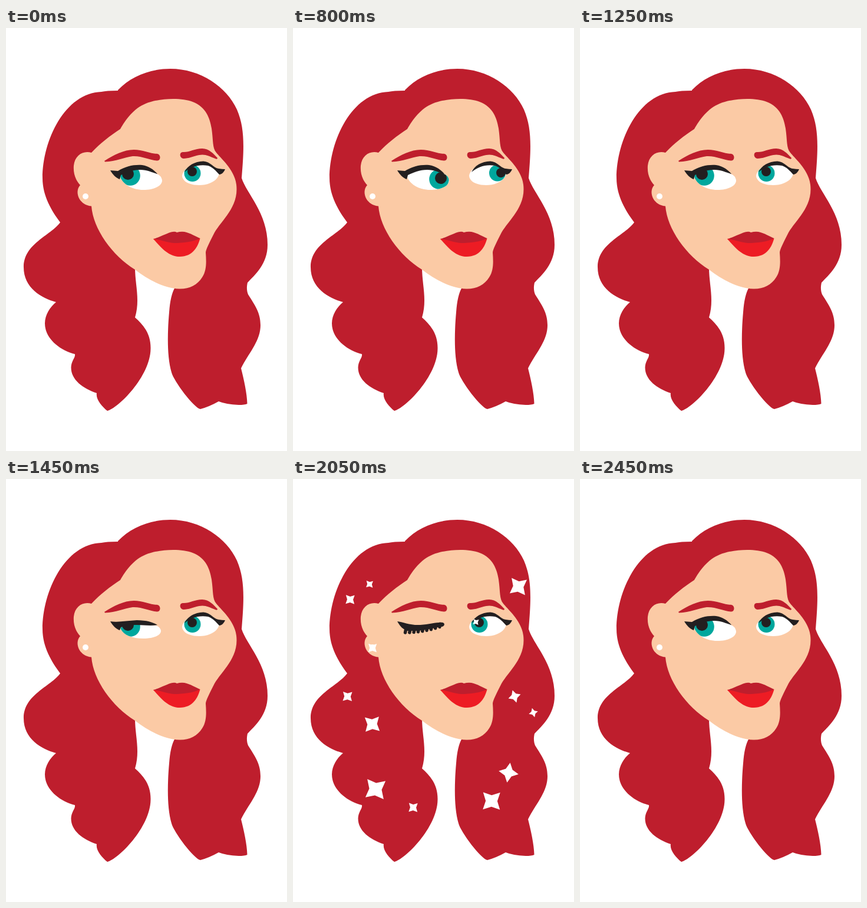
An HTML page for the animation above (2.65 s loop, 477x716 px).

```html
<!DOCTYPE html>
<html lang="en">
<head>
<meta charset="utf-8">
<title>Wink</title>
<style>
html, body { margin: 0; width: 100%; height: 100%; overflow: hidden; background: #fff; }
svg { display: block; width: 100%; height: 100%; }
.hair { fill: #be1e2d; }
.skin { fill: #fbcaa5; }
.ink { fill: #231f20; }
.iris { fill: #00a79d; }
.white { fill: #fff; }
</style>
</head>
<body>
<svg viewBox="0 0 477 716">
  <defs>
    <path id="ballL" d="M193 250C197 263 212 274 233 274C250 274 265 268 265 258Q264 250 256 247C247 238 225 233 205 240Z"/>
    <path id="ballHalf" d="M194 252C198 263 212 270 233 270C250 270 263 265 263 257Q262 251 255 248L205 246Z"/>
    <path id="ballR" d="M299 250C300 262 315 266 328 266C345 266 360 258 362 246C358 237 345 229 330 229C315 230 300 240 299 250Z"/>
    <clipPath id="clipL"><use href="#ballL"/></clipPath>
    <clipPath id="clipHalf"><use href="#ballHalf"/></clipPath>
    <clipPath id="clipR"><use href="#ballR"/></clipPath>
  </defs>

  <path class="hair" d="M190 105C212 82 245 69 279 69C330 69 375 100 392 138C406 170 404 205 400 254C408 280 444 313 444 367C444 400 422 418 410 431C408 440 409 446 411 451C423 470 432 482 432 503C432 530 412 550 399 576C404 596 409 618 409.5 636Q405 638 395 638Q373 637 361 632Q345 641 330 645C319 643 285 598 281 583C273 556 274 515 277 481Q279 452 287 439L219 405C219 435 228 460 219 490C236 505 246 520 245.5 543C245 590 190 644 172 648C163 641 152 628 154 618C130 610 110 595 110.5 574C111 563 118 558 117 552C90 545 66 525 66 500C66 485 75 472 85 464C60 457 30 440 30 405C30 365 75 352 92 329C78 310 62 285 62 254C62 190 100 110 162 108Q170 106 190 106Z"/>
  <path class="skin" d="M145 211C160 195 177 182 194 171C203 155 217 136 237 128C258 119 297 117 317 125C340 134 346 153 349 170C352 190 350 203 357 211C365 221 388 240 391 265C396 305 362 328 352 350C346 362 339 375 339 380C340 395 341 410 333 422C325 435 311 442 294 441.5C268 441 240 425 219 409C180 385 148 340 145 301.5C132 301 121 290 121.5 277Q122 270 126 266C118 257 114 247 115 233C117 215 131 207 145 211Z"/>
  <circle class="white" cx="135" cy="285" r="5"/>

  <path class="hair" d="M167 225C183 215 200 206 217 206C232 206 245 213 257 213C263 214 263 224 257 224.500C245 224 230 216 215 217C200 219 187 226 168 226.500Z"/>
  <path class="hair" d="M300 210C310 211 320 204 333 204C345 204 352 213 359 220C359 222 357 222 355 221C345 217 338 213 328 215C318 217 310 221 301 221C294 220 294 210 300 210Z"/>
  <path class="hair" d="M250 357C262 354 275 346 283 345Q287 344 290 346Q297 344 303 345C313 347 322 353 329.500 356L318 366L262 366Z"/>
  <path fill="#ed1c24" d="M250 357C262 370 275 387 295 387C317 387 326 370 329.500 356C318 362 300 364 285 364C272 363 262 358 250 357Z"/>

  <g id="openL">
    <use class="white" href="#ballL"/>
    <g clip-path="url(#clipL)">
      <circle id="irisL" class="iris" r="16.8"/>
      <circle id="pupilL" class="ink" r="10"/>
    </g>
    <path class="ink" d="M177 241L190 242C203 234 217 231 231 232C243 234 251 240 257 247C249 245 240 240 228 240C215 240 203 245 195 249Q194 253 193 256C187 254 181 248 177 241Z"/>
  </g>
  <g id="halfL">
    <use class="white" href="#ballHalf"/>
    <g clip-path="url(#clipHalf)">
      <circle class="iris" cx="211" cy="250" r="16.8"/>
      <circle class="ink" cx="207" cy="247" r="10"/>
    </g>
    <path class="ink" d="M177 241C190 243 205 240 222 239C240 239 250 243 257 247C245 249 235 247 222 247C210 247 202 249 195 251L193 256C187 254 181 248 177 241Z"/>
  </g>
  <g id="shutL">
    <path class="ink" d="M177 241C186 242 200 248 216 247C232 246 245 242 254 243C259 244 257 250 252 250C240 252 225 256 210 257L192 257Q191 255 188 254C183 251 180 246 177 241Z"/>
    <path id="lashes" fill="none" stroke="#231f20" stroke-width="5.500" stroke-linecap="round"/>
  </g>

  <use class="white" href="#ballR"/>
  <g clip-path="url(#clipR)">
    <circle id="irisR" class="iris" r="14"/>
    <circle id="pupilR" class="ink" r="8"/>
  </g>
  <path class="ink" d="M303 244C308 233 320 226 335 225.500C347 226 352 237 361 238Q367 239 372 239C370 244 366 248 362 248C357 243 352 236 343 233C328 230 313 235 303 244Z"/>

  <g id="stars" class="white"></g>
</svg>
<script>
const $ = id => document.getElementById(id);

// x, y, tip radius, angle in degrees
const STARS = [
  [97, 204, 10.5, 47], [130, 178, 8, 48], [382.5, 182, 18.5, 52],
  [92.5, 368, 11, 47], [134.5, 415, 17, 42], [140, 525, 22, 51],
  [204, 556, 10.5, 47], [376, 368, 11, 72], [408, 395.5, 8, 74],
  [366, 497, 17, 9], [337, 545, 20.5, 46], [135, 286, 10, 46],
  [310.5, 242, 6.5, 52]
];

function starPath(r) {
  const points = [];
  for (let i = 0; i < 8; i++) {
    const a = i * Math.PI / 4, d = i % 2 ? r * 0.48 : r;
    points.push((d * Math.cos(a)).toFixed(2) + ' ' + (d * Math.sin(a)).toFixed(2));
  }
  return 'M' + points.join('L') + 'Z';
}

const stars = STARS.map(([x, y, r, angle]) => {
  const el = document.createElementNS('http://www.w3.org/2000/svg', 'path');
  el.setAttribute('d', starPath(r));
  $('stars').append(el);
  return turn => el.setAttribute('transform', `translate(${x} ${y}) rotate(${angle + turn})`);
});

$('lashes').setAttribute('d', Array.from({ length: 9 }, (_, i) => {
  const x = 190.5 + i * 7.3, y = 260 - i * i * 0.15;
  return `M${x + 1} ${y - 5}L${x} ${y}`;
}).join(''));

// Centres of left iris, left pupil, right iris, right pupil
const LOOK = {
  left: [211, 250, 207, 247, 316.5, 246, 316, 243],
  front: [221, 249, 220.5, 247, 327, 245, 326.5, 241],
  side: [234, 253, 236, 251, 337, 245.5, 340, 243.5],
  right: [248, 256, 251, 254, 347, 245.5, 353, 245]
};

// Start time, look, left lid, star turn (null hides the stars)
const STEPS = [
  [0, 'left', 'open', null],
  [500, 'front', 'open', null],
  [650, 'side', 'open', null],
  [800, 'right', 'open', null],
  [950, 'side', 'open', null],
  [1100, 'front', 'open', null],
  [1250, 'left', 'open', null],
  [1450, 'left', 'half', null],
  [1650, 'left', 'shut', 0],
  [1850, 'left', 'shut', 45],
  [2050, 'left', 'shut', 0],
  [2250, 'left', 'half', null],
  [2450, 'left', 'open', null]
];
const LOOP = 2650;
const EYE_PARTS = ['irisL', 'pupilL', 'irisR', 'pupilR'];
let shown;

function show(step) {
  if (step === shown) return;
  shown = step;
  const [, look, lid, turn] = step;
  EYE_PARTS.forEach((id, i) => {
    $(id).setAttribute('cx', LOOK[look][i * 2]);
    $(id).setAttribute('cy', LOOK[look][i * 2 + 1]);
  });
  for (const name of ['open', 'half', 'shut'])
    $(name + 'L').style.display = name === lid ? '' : 'none';
  $('stars').style.display = turn === null ? 'none' : '';
  if (turn !== null) stars.forEach(rotate => rotate(turn));
}

const start = performance.now();
function tick(now) {
  const t = Math.max(0, now - start) % LOOP;
  show(STEPS.filter(step => step[0] <= t).pop());
  requestAnimationFrame(tick);
}
show(STEPS[0]);
requestAnimationFrame(tick);
</script>
</body>
</html>
```
